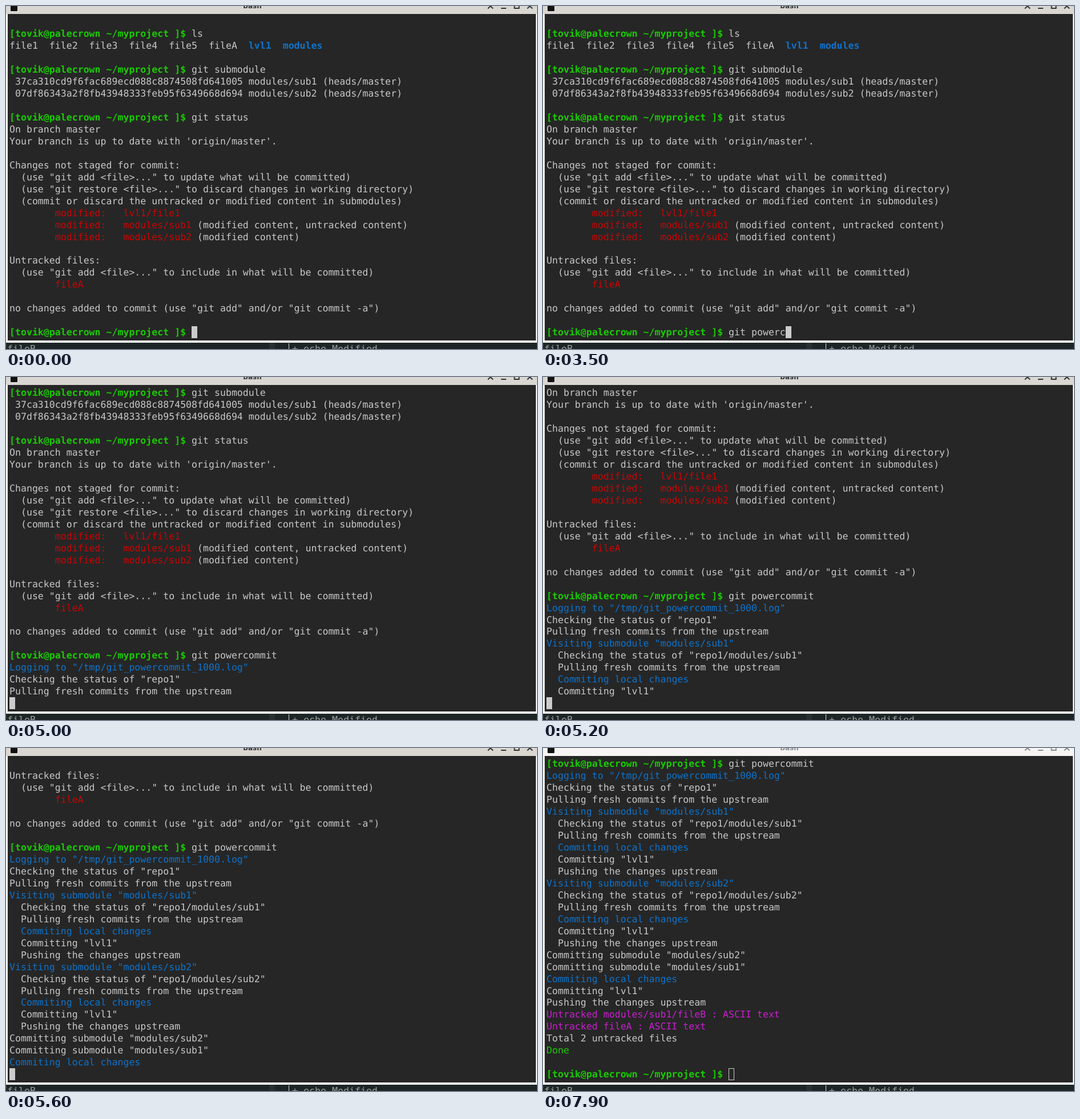
An HTML page that plays this animation: 930x602 px, repeating every 8000 ms.

```html
<!DOCTYPE html>
<html lang="en">
<head>
<meta charset="utf-8">
<title>Terminal session</title>
<style>
  html, body { margin: 0; width: 100%; height: 100%; overflow: hidden; background: #f6f5f4; }
  svg, .screen, #cursor { position: absolute; }
  svg { left: 0; top: 0; }
  .screen {
    box-sizing: border-box; left: 3px; top: 14px; width: 925px; height: 573px;
    margin: 0; padding: 4.4px 0 0 3px; overflow: hidden;
    background: #262626; color: #c8c8c8;
    font: 16.57px/20.956px "DejaVu Sans Mono", monospace;
    text-rendering: geometricPrecision;
  }
  #tear { clip-path: inset(440px 0 0 0); }
  #tear[hidden] { display: none; }
  #cursor { box-sizing: border-box; top: 562px; width: 10px; height: 21px; border: 1px solid #ccc; }
  .red { color: #cc0403; }
  .green { color: #19cb00; }
  .blue { color: #0d73cc; }
  .pink { color: #cb1ed1; }
  #bar { fill: #dad6d2; }
  #controls { fill: none; stroke: #2e3436; stroke-width: 2; }
  #title { fill: #2e3436; font: bold 12px "DejaVu Sans", sans-serif; }
  .inactive #bar { fill: #f6f5f4; }
  .inactive #controls { stroke: #8b8e8f; }
  .inactive #title { fill: #8b8e8f; }
  .behind { fill: #98a29f; font: 16.6px "DejaVu Sans Mono", monospace; }
</style>
</head>
<body>
<svg id="chrome" width="930" height="602">
  <rect id="bar" width="930" height="14"/>
  <rect x="8" y="-3" width="12" height="12" rx="1.5" fill="#111"/>
  <text id="title" x="431.5" y="4" text-anchor="middle">bash</text>
  <path id="controls" d="M844 4.5l4.5-4.5 4.5 4.5M867 4h9M890.5-4v8h8v-8M913 4.5l9-9M922 4.5l-9-9"/>
  <rect y="591" width="930" height="11" fill="#1d2526"/>
  <rect x="461" y="591" width="10" height="11" fill="#293031"/>
  <rect x="495" y="592" width="1" height="10" fill="#d5d9d8"/>
  <text class="behind" x="-8" y="607">/fileB</text>
  <text class="behind" x="501" y="607">+ echo Modified</text>
</svg>
<pre class="screen" id="main"></pre>
<pre class="screen" id="tear"></pre>
<div id="cursor"></div>
<script>
const LOOP = 8000, ROWS = 27, CELL = 9.976, LEFT = 6;
const get = id => document.getElementById(id);
const paint = (color, text) => `<span class="${color}">${text}</span>`;
const red = text => paint("red", text);
const blue = text => paint("blue", text);
const pink = text => paint("pink", text);
const prompt = `<b class="green">[tovik@palecrown ~/myproject ]$</b> `;
const promptWidth = 32;
const command = "git powercommit";

const history = `
${prompt}ls
file1  file2  file3  file4  file5  fileA  <b class="blue">lvl1</b>  <b class="blue">modules</b>

${prompt}git submodule
 37ca310cd9f6fac689ecd088c8874508fd641005 modules/sub1 (heads/master)
 07df86343a2f8fb43948333feb95f6349668d694 modules/sub2 (heads/master)

${prompt}git status
On branch master
Your branch is up to date with 'origin/master'.

Changes not staged for commit:
  (use "git add &lt;file>..." to update what will be committed)
  (use "git restore &lt;file>..." to discard changes in working directory)
  (commit or discard the untracked or modified content in submodules)
        ${red("modified:   lvl1/file1")}
        ${red("modified:   modules/sub1")} (modified content, untracked content)
        ${red("modified:   modules/sub2")} (modified content)

Untracked files:
  (use "git add &lt;file>..." to include in what will be committed)
        ${red("fileA")}

no changes added to commit (use "git add" and/or "git commit -a")
`.split("\n");

const sync = (path, indent = "") => [
  `${indent}Checking the status of "${path}"`,
  `${indent}Pulling fresh commits from the upstream`];
const commit = (indent = "") => [
  indent + blue("Commiting local changes"),
  `${indent}Committing "lvl1"`,
  `${indent}Pushing the changes upstream`];
const visit = name => [
  blue(`Visiting submodule "modules/${name}"`),
  ...sync(`repo1/modules/${name}`, "  "),
  ...commit("  ")];

const output = [
  blue('Logging to "/tmp/git_powercommit_1000.log"'),
  ...sync("repo1"),
  ...visit("sub1"),
  ...visit("sub2"),
  'Committing submodule "modules/sub2"',
  'Committing submodule "modules/sub1"',
  ...commit(),
  pink("Untracked modules/sub1/fileB : ASCII text"),
  pink("Untracked fileA : ASCII text"),
  "Total 2 untracked files",
  paint("green", "Done"),
  "",
  prompt];

const keyTimes = [1100, 1200, 1300, 1500, 1800, 1900, 2000, 2100, 2400,
                  3500, 4000, 4200, 4400, 4500, 4600];
const RUN = 4900, TEAR = 5700, DONE = 5800, BLUR = 7900;
const printed = [2, 3, 6, 8, 9, 12, 15, 18, 18];  // output lines per 100 ms

const lastRows = lines => lines.slice(-ROWS).join("\n");
const finished = lastRows([...history, prompt + command, ...output]);
const typedAt = t => keyTimes.filter(k => k <= t).length;

function screenAt(t) {
  if (t >= DONE) return finished;
  const lines = [...history, prompt + command.slice(0, typedAt(t))];
  if (t >= RUN) lines.push(...output.slice(0, printed[Math.floor((t - RUN) / 100)]), "");
  return lastRows(lines);
}

function cursorColumn(t) {
  if (t >= TEAR) return promptWidth;
  if (t >= RUN) return 0;
  return promptWidth + typedAt(t);
}

let shown;
function draw() {
  const t = performance.now() % LOOP;
  const html = screenAt(t);
  if (html !== shown) get("main").innerHTML = shown = html;
  // The lower part of the window repaints slightly before the rest.
  get("tear").hidden = t < TEAR || t >= DONE;
  get("cursor").style.left = Math.round(LEFT + cursorColumn(t) * CELL) + "px";
  get("cursor").style.background = t >= BLUR ? "none" : "#ccc";
  get("chrome").classList.toggle("inactive", t >= BLUR);
  requestAnimationFrame(draw);
}

get("tear").innerHTML = finished;
draw();
</script>
</body>
</html>
```
